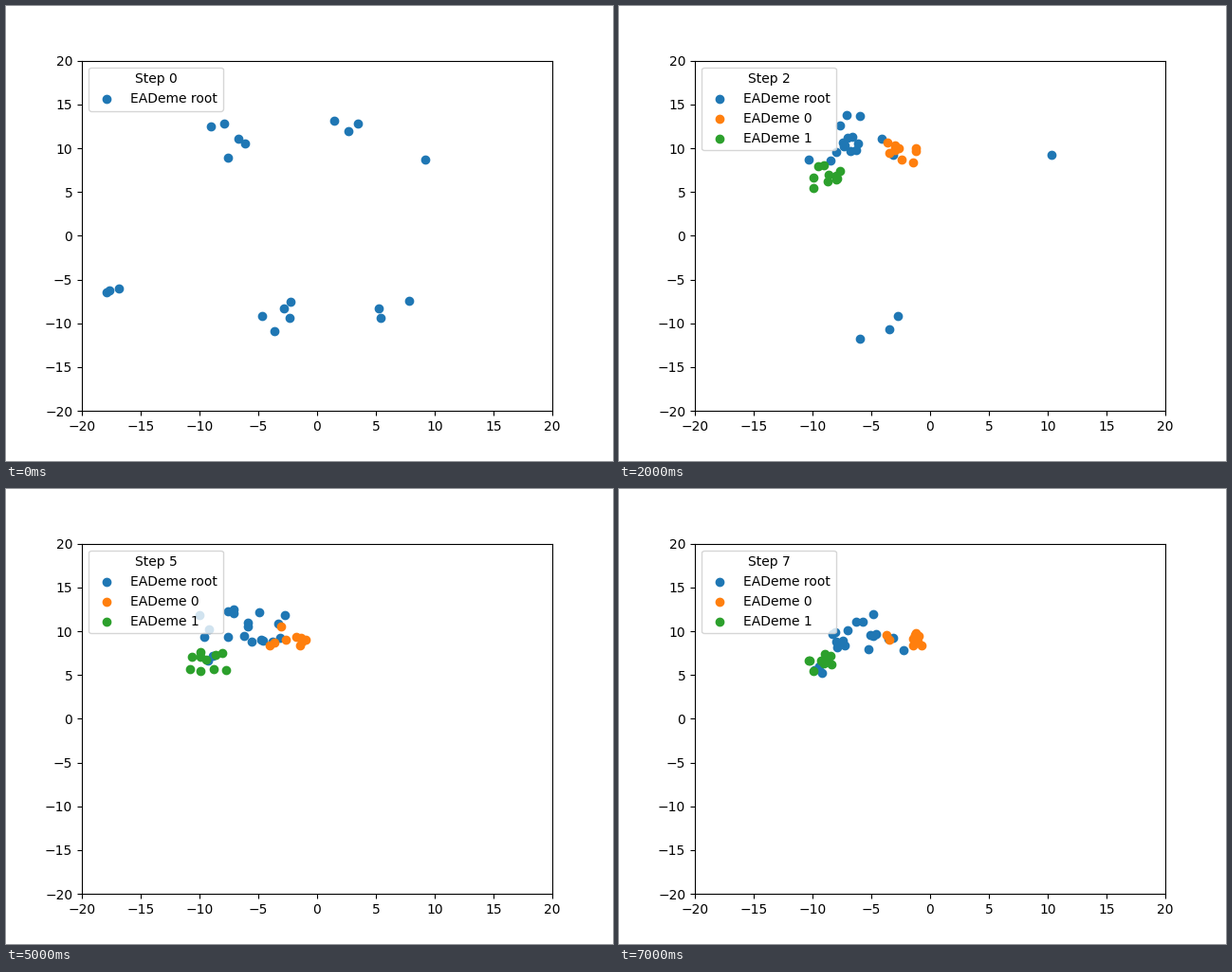
Animation, 640 px wide and 480 px high, one loop 8 s. Source, as a matplotlib script:

```python
import random

import matplotlib.pyplot as plt
from matplotlib.animation import FuncAnimation

STEPS = 8
LIMIT = 20
ROOT_SIZE = 20
CHILD_SIZE = 10

# Individuals that survive from one generation to the next
EARLY_BEST = (-6.13, 10.54)
ROOT_BEST = (-3.15, 9.24)
FIRST_BEST = (-1.45, 8.38)
SECOND_BEST = (-9.92, 5.45)

# Outlying basins that die out: x, y, half width, half height, size, lifetime
FADING = [
    (-17.7, -6.2, 2, 0.7, 3, 1),
    (1.5, 12.8, 3.5, 4, 3, 1.5),
    (9.5, 8.2, 1.2, 1.6, 1, 5),
    (-4, -10, 3, 3, 5, 5),
    (5.5, -8.5, 4, 1.5, 3, 2),
]


def cloud(rng, count, x, y, width, height):
    """Scatter points around a centre, densest in the middle."""
    return [(rng.triangular(x - width, x + width),
             rng.triangular(y - height, y + height)) for _ in range(count)]


def lerp(start, end, progress):
    return start + (end - start) * progress


def root_deme(rng, step, progress):
    points = []
    if step < 3:
        points.append(EARLY_BEST)
    if step > 1:
        points.append(ROOT_BEST)
    for *basin, size, life in FADING:
        points += cloud(rng, round(size * max(0, 1 - step / life)), *basin)
    points += cloud(rng, min(3, max(0, step - 3)), -9.5, 6.2, 1.8, 1.5)
    points += cloud(rng, ROOT_SIZE - len(points),
                    lerp(-7.8, -5.4, progress), lerp(11.4, 9.9, progress),
                    lerp(4.5, 4, progress), 3)
    return points


def first_deme(rng, step, progress):
    """Two close basins; the population moves from the left to the right."""
    left = CHILD_SIZE - 1 - step
    return ([FIRST_BEST] + cloud(rng, left, -3.4, 9.4, 1.4, 1.6)
            + cloud(rng, step, -1.2, 9.1, 0.6, 1.4))


def second_deme(rng, step, progress):
    return [SECOND_BEST] + cloud(
        rng, CHILD_SIZE - 1, -9.2, lerp(7.2, 6.4, progress),
        lerp(2.4, 1.6, progress), lerp(2.2, 1.1, progress))


# Label, builder and first step of each deme
DEMES = [
    ("EADeme root", root_deme, 0),
    ("EADeme 0", first_deme, 1),
    ("EADeme 1", second_deme, 2),
]

fig, ax = plt.subplots(figsize=(6.4, 4.8), dpi=100)


def draw(step):
    rng = random.Random(step)
    ax.clear()
    ax.set(xlim=(-LIMIT, LIMIT), ylim=(-LIMIT, LIMIT))
    for label, build, start in DEMES:
        if step >= start:
            points = build(rng, step, step / (STEPS - 1))
            ax.scatter(*zip(*points), label=label)
    ax.legend(title=f"Step {step}", loc="upper left")
    return []


anim = FuncAnimation(fig, draw, frames=STEPS, init_func=lambda: [],
                     interval=1000, repeat=True, repeat_delay=0)
plt.show()
```
